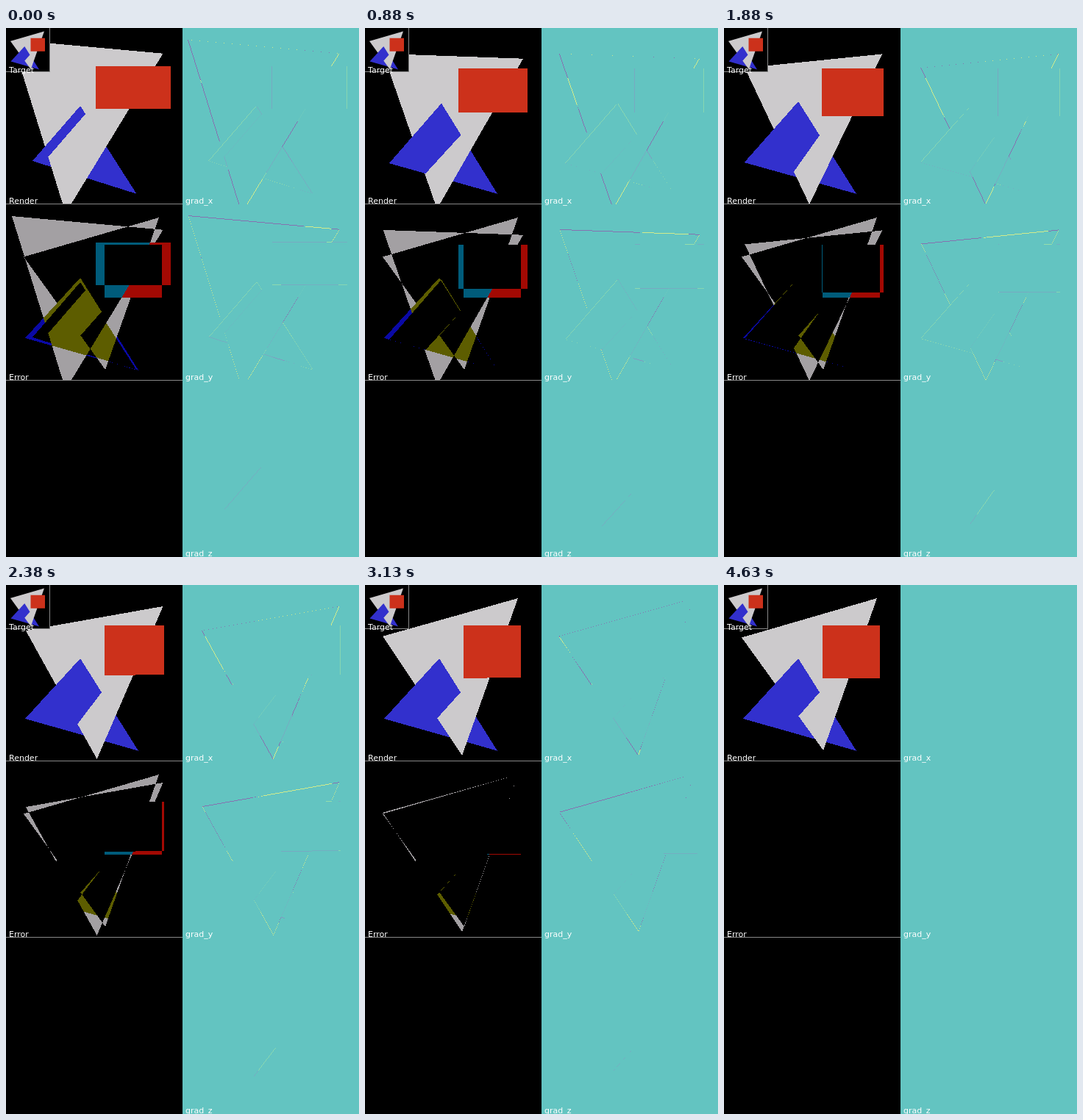
Animation of 480x720 px, one loop 4.76 s. Source, as an HTML page with a canvas:

```html
<!DOCTYPE html>
<html lang="en">
<head>
<meta charset="utf-8">
<title>Inverse rendering</title>
<style>
html, body { margin: 0; width: 480px; height: 720px; overflow: hidden; background: #000; }
canvas { display: block; }
</style>
</head>
<body>
<canvas id="stage" width="480" height="720"></canvas>
<script>
const LOOP = 4760, STEP = 125, N = 240, W = 480, LAST = 37;
const ctx = document.getElementById('stage').getContext('2d');

// Colours by id: background, white, blue, red
const colors = [[0, 0, 0], [204, 202, 204], [50, 48, 205], [204, 49, 27]];
const viridis = [[68, 1, 84], [59, 82, 139], [33, 145, 140], [94, 201, 98], [253, 231, 37]];

const lerp = (p, q, u) => p.map((v, k) => v + (q[k] - v) * u);

// Point on the Bezier curve through pts, which is travelled in span steps
function move(step, span, ...pts) {
  const u = Math.min(1, step / span);
  while (pts.length > 1) pts = pts.slice(1).map((q, i) => lerp(pts[i], q, u));
  return pts[0];
}

function sceneAt(step) {
  const [left] = move(step, 17, [122], [134]);
  const [right] = move(step, 25, [224], [212]);
  const [top] = move(step, 4, [52], [55.2]);
  const [bottomLeft] = move(step, 25, [110.3], [127]);
  const [bottomRight] = move(step, 27, [110.3], [127]);
  return {
    white: [
      ...move(step, 29, [8, 16], [43, 42], [22, 71], [24, 71.5]),
      ...move(step, 25, [213.5, 34.7], [215, 52.3], [219, 33], [208, 18]),
      ...move(step, 34, [81, 252], [108, 243], [140, 234], [135, 225])
    ],
    blue: [
      ...move(step, 12, [101, 106], [107, 103], [101, 100]),
      ...move(step, 5, [177.5, 225.7], [180, 225.7]),
      ...move(step, 17, [36, 181], [33, 187], [26, 182])
    ],
    red: [left, top, right, top, right, bottomRight, left, bottomLeft],
    // line where the white and blue triangles pass through each other
    cut: [
      ...move(step, 7, [108, 117], [130, 146]),
      ...move(step, 30, [57, 176], [108, 228], [92, 176], [101, 179])
    ]
  };
}

const side = (ax, ay, bx, by, x, y) => (bx - ax) * (y - ay) - (by - ay) * (x - ax);

function inside(p, x, y) {
  for (let i = 0, n = p.length; i < n; i += 2) {
    const j = (i + 2) % n;
    if (side(p[i], p[i + 1], p[j], p[j + 1], x, y) < 0) return false;
  }
  return true;
}

// ids: visible shape per pixel; both: white and blue overlap there
function rasterize(step) {
  const { white, blue, red, cut } = sceneAt(step);
  const ids = new Uint8Array(N * N), both = new Uint8Array(N * N);
  for (let i = 0; i < N * N; i++) {
    const x = i % N + 0.5, y = Math.floor(i / N) + 0.5;
    if (inside(red, x, y)) { ids[i] = 3; continue; }
    const w = inside(white, x, y), b = inside(blue, x, y);
    both[i] = w && b;
    ids[i] = w && b ? (side(...cut, x, y) > 0 ? 2 : 1) : w ? 1 : b ? 2 : 0;
  }
  return { ids, both };
}

function heat(g) {
  const v = Math.max(0, Math.min(1, 0.5 + 0.38 * g)) * 4, k = Math.min(3, Math.floor(v));
  return lerp(viridis[k], viridis[k + 1], v - k).map(c => 255 * (c / 255) ** 0.465);
}
const flat = heat(0);

const goal = rasterize(LAST).ids;
const thumb = document.createElement('canvas');
thumb.width = thumb.height = N;
{
  const tc = thumb.getContext('2d'), im = tc.createImageData(N, N);
  goal.forEach((id, i) => im.data.set([...colors[id], 255], i * 4));
  tc.putImageData(im, 0, 0);
}

const image = ctx.createImageData(W, 720);
function plot(x, y, [r, g, b]) {
  const o = (y * W + x) * 4, d = image.data;
  d[o] = r; d[o + 1] = g; d[o + 2] = b; d[o + 3] = 255;
}

// Loss gradient across the boundary between neighbouring pixels i and j
function slope(ids, i, j) {
  if (ids[i] === ids[j]) return 0;
  const a = colors[ids[i]], b = colors[ids[j]], p = colors[goal[i]], q = colors[goal[j]];
  let g = 0;
  for (let c = 0; c < 3; c++) g -= (a[c] - p[c] + b[c] - q[c]) / 2 * (b[c] - a[c]);
  return g / 65025;
}

function draw(step) {
  const { ids, both } = rasterize(step);
  for (let y = 0; y < N; y++) for (let x = 0; x < N; x++) {
    const i = y * N + x, c = colors[ids[i]], t = colors[goal[i]];
    plot(x, y, c);
    plot(x, y + N, c.map((v, k) => (v - t[k]) ** 2 / 255));
    plot(x, y + 2 * N, colors[0]);
    const right = x < N - 1 ? i + 1 : i, below = y < N - 1 ? i + N : i;
    let gx = slope(ids, i, right), gy = slope(ids, i, below), gz = 0;
    if (both[i] && both[right]) { gz = gx; gx *= 0.4; }
    if (both[i] && both[below]) gy *= 0.4;
    [gx, gy, gz].forEach((g, k) => plot(x + N, y + k * N, g ? heat(g) : flat));
  }
  ctx.putImageData(image, 0, 0);

  ctx.fillStyle = '#000';
  ctx.fillRect(0, 0, 60, 60);
  ctx.imageSmoothingQuality = 'high';
  ctx.drawImage(thumb, 0, 0, 60, 60);
  ctx.fillStyle = '#888';
  ctx.fillRect(59, 0, 1, 60);
  ctx.fillRect(0, 59, 60, 1);
  ctx.fillRect(0, 239, N, 1);
  ctx.fillRect(0, 479, N, 1);

  ctx.fillStyle = '#fff';
  ctx.font = '11px "DejaVu Sans", sans-serif';
  ctx.fillText('Target', 4, 61);
  ['Render', 'Error'].forEach((s, k) => ctx.fillText(s, 4, 239 + k * N));
  ['grad_x', 'grad_y', 'grad_z'].forEach((s, k) => ctx.fillText(s, 244, 239 + k * N));
}

// Steps begin at multiples of 125 ms rounded to 10 ms
function stepAt(t) {
  const k = Math.floor(t / STEP);
  return Math.min(LAST, t < Math.round(k * STEP / 10) * 10 ? k - 1 : k);
}

const start = performance.now();
let shown = -1;
function tick() {
  const step = stepAt((performance.now() - start) % LOOP);
  if (step !== shown) draw(shown = step);
  requestAnimationFrame(tick);
}
tick();
</script>
</body>
</html>
```
